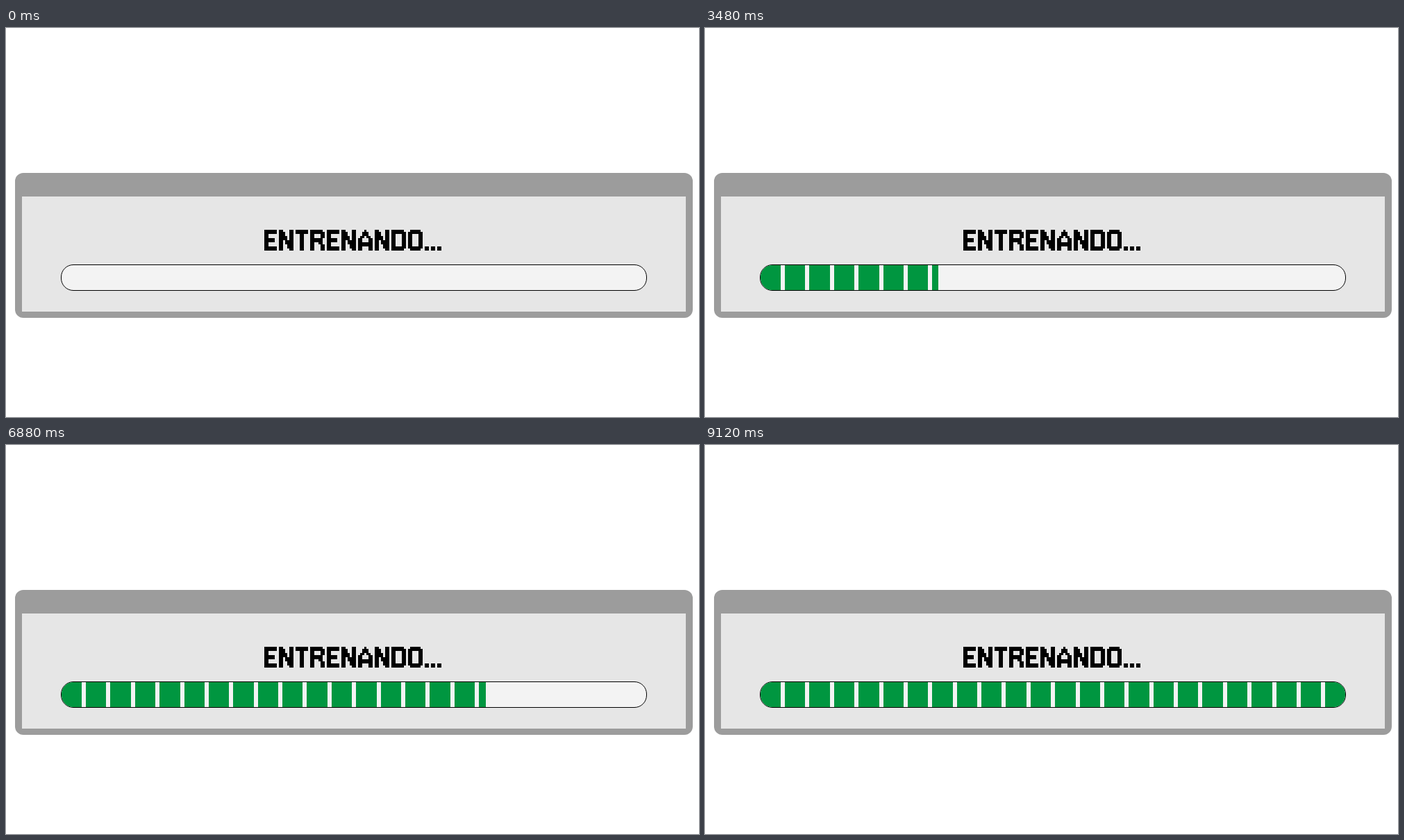
Animation of 998 by 561 pixels, one loop 9320 ms. Source, as an HTML page:

```html
<!DOCTYPE html>
<html lang="es">
<head>
<meta charset="utf-8">
<title>Entrenando...</title>
<style>
  html, body { margin: 0; width: 100%; height: 100%; overflow: hidden; background: #fff; }
  div, svg { position: absolute; box-sizing: border-box; }
  .window { left: 13px; top: 209px; width: 976px; height: 209px; border-radius: 12px; background: #9c9c9c; }
  .body { left: 23px; top: 243px; width: 956px; height: 166px; background: #e6e6e6; }
  .label { left: 372px; top: 291px; }
  .track {
    --empty: #f3f3f3;
    left: 79px; top: 341px; width: 844px; height: 38px;
    border: 1px solid #000; border-radius: 18px;
    background: var(--empty); overflow: hidden;
  }
  .fill {
    left: -1px; top: 0; height: 100%;
    background: repeating-linear-gradient(90deg,
      var(--empty) 0 .6px, #009640 .6px 30px, var(--empty) 30px 35.38px);
    animation: load 9320ms -1ms infinite;
  }
  /* empty until 1040 ms, then one step every 40 ms until 9120 ms */
  @keyframes load {
    0% { width: 0; animation-timing-function: step-end; }
    11.15880% { width: 2px; animation-timing-function: steps(202, end); }
    97.85408%, 100% { width: 846px; }
  }
</style>
</head>
<body>
<div class="window"></div>
<div class="body"></div>
<svg class="label" width="255" height="30" viewBox="0 0 85 10" shape-rendering="crispEdges" role="img" aria-label="ENTRENANDO..."><path/></svg>
<div class="track"><div class="fill"></div></div>
<script>
  // Pixel letters, one row per word
  const glyphs = {
    E: '###### ###### ##.... ##.... #####. #####. ##.... ##.... ###### ######',
    N: '##...## ###..## ###..## ####.## ####.## ##.#### ##.#### ##..### ##..### ##...##',
    T: '###### ###### ..##.. ..##.. ..##.. ..##.. ..##.. ..##.. ..##.. ..##..',
    R: '######. ####### ##...## ##...## ######. ######. ##..##. ##...## ##...## ##...##',
    A: '...#... ..###.. ..###.. .##.##. ##...## ##...## ####### ####### ##...## ##...##',
    D: '######. ####### ##...## ##...## ##...## ##...## ##...## ##...## ####### ######.',
    O: '.#####. ####### ##...## ##...## ##...## ##...## ##...## ##...## ####### .#####.',
    '.': '.. .. .. .. .. .. .. .. ## ##'
  };

  function textPath(text) {
    let x = 0, d = '';
    for (const char of text) {
      const rows = glyphs[char].split(' ');
      rows.forEach((row, y) => {
        for (const run of row.matchAll(/#+/g)) {
          const w = run[0].length;
          d += `M${x + run.index} ${y}h${w}v1h-${w}z`;
        }
      });
      x += rows[0].length + 1;
    }
    return d;
  }

  const label = document.querySelector('.label');
  label.firstChild.setAttribute('d', textPath(label.getAttribute('aria-label')));
</script>
</body>
</html>
```
